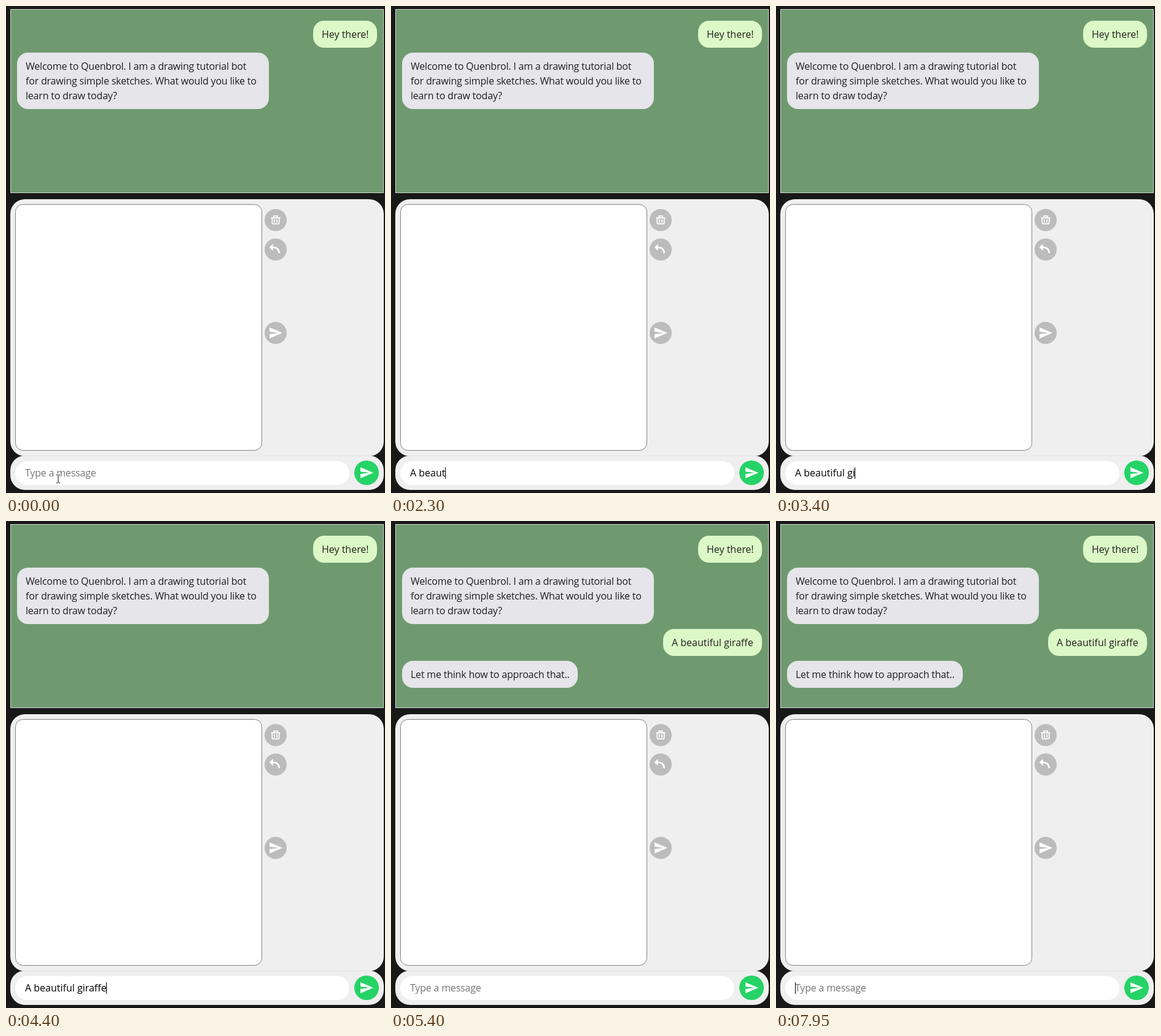
Recreate the animation shown at these times as an HTML page. Size 617 by 794 pixels, loop 8 s.

```html
<!DOCTYPE html>
<html lang="en">
<head>
<meta charset="utf-8">
<title>Drawing tutorial chat</title>
<style>
  html, body { margin: 0; width: 100%; height: 100%; overflow: hidden; background: #181818; }
  svg { display: block; width: 617px; height: 794px; }
  text { font: 16px "Open Sans", "Noto Sans", sans-serif; fill: #212121; white-space: pre; }
  .tight { letter-spacing: -0.2px; }
  .mine { fill: #dcf8c6; }
  .bot { fill: #e5e5ea; }
  .button { fill: #bcbcbc; }
  .icon { fill: #fff; }
  .line { fill: none; stroke: #fff; }
</style>
</head>
<body>
<svg viewBox="0 0 617 794" xmlns="http://www.w3.org/2000/svg">
  <defs>
    <path id="plane" class="icon" d="M2 21L23 12 2 3V10L17 12 2 14Z"/>
  </defs>
  <rect width="617" height="794" fill="#181818"/>

  <!-- chat -->
  <rect x="7.5" y="5.5" width="607" height="299" fill="#6f9a70" stroke="#ced8ce"/>
  <rect class="mine" x="500" y="24" width="104" height="44" rx="18"/>
  <text x="514" y="52">Hey there!</text>
  <rect class="bot" x="18" y="76" width="410" height="92" rx="18"/>
  <text class="tight" x="32" y="104">Welcome to Quenbrol. I am a drawing tutorial bot</text>
  <text class="tight" x="32" y="128">for drawing simple sketches. What would you like to</text>
  <text class="tight" x="32" y="152">learn to draw today?</text>
  <g id="request">
    <rect class="mine" x="443" y="176" width="161" height="44" rx="18"/>
    <text x="457" y="204">A beautiful giraffe</text>
  </g>
  <g id="reply">
    <rect class="bot" x="18" y="228" width="286" height="44" rx="18"/>
    <text class="tight" x="32" y="256">Let me think how to approach that..</text>
  </g>

  <!-- drawing panel -->
  <rect x="7" y="315" width="608" height="419" rx="24" fill="#efefef"/>
  <rect x="15.5" y="323.5" width="401" height="401" rx="12" fill="#fff" stroke="#828282"/>
  <circle class="button" cx="439" cy="349" r="18"/>
  <g class="line" stroke-width="1.7">
    <path d="M431.5 345.3H446.5M436.2 345V342.3H441.8V345"/>
    <path d="M433.3 345V353.5Q433.3 355.2 435 355.2H443Q444.7 355.2 444.7 353.5V345"/>
    <path d="M436.9 347.5V353M441.1 347.5V353"/>
  </g>
  <circle class="button" cx="439" cy="397" r="18"/>
  <path class="icon" d="M428.6 393.4L434.6 387.8V399Z"/>
  <path class="line" stroke-width="2.5" d="M433.5 393.4C440.5 393.2 444.5 396.5 444.7 403"/>
  <circle class="button" cx="439" cy="533" r="18"/>
  <use href="#plane" x="427" y="521"/>

  <!-- message bar -->
  <rect x="7" y="733" width="608" height="56" rx="24" fill="#efefef"/>
  <path d="M29 733.5H593" stroke="#e6e6e6"/>
  <rect x="15" y="742" width="544" height="39" rx="19.5" fill="#fff"/>
  <circle cx="587" cy="761" r="20" fill="#25d366"/>
  <use href="#plane" x="575" y="749"/>
  <text id="hint" class="tight" x="31" y="767" style="fill:#757575">Type a message</text>
  <text id="typed" x="31" y="767" style="fill:#000"></text>
  <rect id="caret" y="752" width="1" height="19" fill="#000"/>
  <g id="pointer" fill="none">
    <path id="beam" d="M82 764.5H84L85 765.5L86 764.5H88M85 765.5V776.5M82 777.5H84L85 776.5L86 777.5H88" stroke="#fff" stroke-width="2.6"/>
    <use href="#beam"/>
    <path d="M82 764.5H84L85 765.5L86 764.5H88M85 765.5V776.5M82 777.5H84L85 776.5L86 777.5H88" stroke="#111"/>
  </g>
</svg>
<script>
const LOOP = 8000, SENT = 4950, REPLIED = 5400;
const MESSAGE = "A beautiful giraffe";

// [time, number of letters typed]
const KEYS = [
  [850, 1], [1600, 3], [1800, 4], [1950, 5], [2150, 6],
  [2300, 7], [2350, 8], [2450, 9], [2550, 10], [2650, 11],
  [2950, 12], [3300, 13], [3400, 14], [3450, 15], [3500, 16],
  [4250, 17], [4350, 18], [4400, 19], [SENT, 0]
];

// spans in which the caret shows
const CARET_ON = [
  [150, 750], [850, 1350], [1600, 3150], [3300, 3800],
  [4250, 4900], [5600, 6150], [6800, 7400], [7950, LOOP]
];

const [request, reply, hint, typed, caret, pointer] =
  ["request", "reply", "hint", "typed", "caret", "pointer"].map(id => document.getElementById(id));

const show = (el, on) => el.setAttribute("visibility", on ? "visible" : "hidden");

function lettersAt(t) {
  let count = 0;
  for (const [time, n] of KEYS) if (t >= time) count = n;
  return count;
}

function draw(t) {
  const count = lettersAt(t);
  typed.textContent = MESSAGE.slice(0, count);
  const width = count ? typed.getComputedTextLength() : 0;
  caret.setAttribute("x", Math.floor(31 + width));
  show(caret, CARET_ON.some(([from, to]) => t >= from && t < to));
  show(hint, count === 0);
  show(pointer, t < KEYS[0][0]);
  show(request, t >= SENT);
  show(reply, t >= REPLIED);
}

const start = performance.now();
function tick() {
  draw((performance.now() - start) % LOOP);
  requestAnimationFrame(tick);
}
tick();
</script>
</body>
</html>
```
